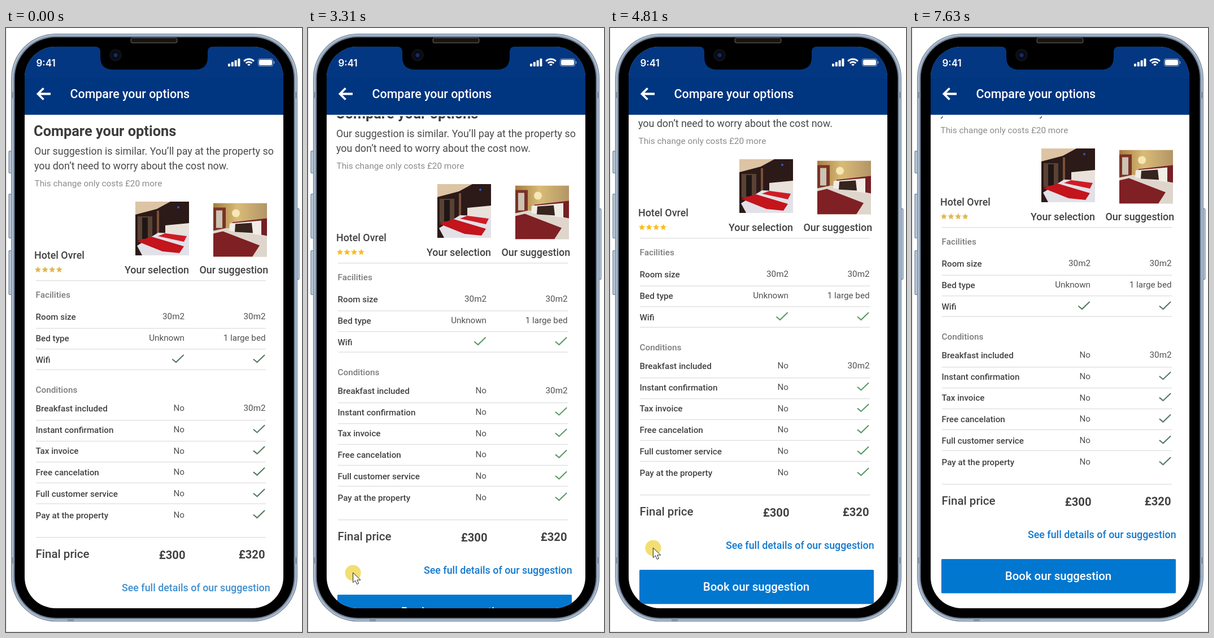
Animation of 524x1068 px, one loop 8.73 s. Source, as an HTML page with a canvas:

```html
<!DOCTYPE html>
<html lang="en">
<head>
<meta charset="utf-8">
<title>Compare your options</title>
<style>
html, body { margin: 0; width: 100%; height: 100%; overflow: hidden; background: #fff; }
canvas { display: block; width: 524px; height: 1068px; }
</style>
</head>
<body>
<canvas id="stage"></canvas>
<script>
const W = 524, H = 1068, LOOP = 8730;
const ENTER = 1790, PRESS = 2410, SETTLE = 6330, RELEASE = 7130, FLICK = 7530, LEAVE = 7630;
const SCREEN = { x: 33, y: 33, w: 458, h: 993 };
const TICK = '✓';

const canvas = document.getElementById('stage');
const ctx = canvas.getContext('2d');
const dpr = window.devicePixelRatio || 1;
canvas.width = W * dpr;
canvas.height = H * dpr;

const lerp = (a, b, k) => a + (b - a) * k;
const progress = (t, from, to) => Math.min(1, Math.max(0, (t - from) / (to - from)));
// The picture advances ten times a second
const step = (t, from) => from + Math.floor((t - from) / 100) * 100;

// A hand drag: slow grip, quick pull, long slow tail
const DRAG = [[PRESS, 0], [2910, 12], [3710, 49], [4810, 75], [SETTLE, 94]];

function scrollAt(t) {
  const now = step(t, PRESS);
  let offset = 0;
  for (let i = 1; i < DRAG.length; i++) {
    const [from, a] = DRAG[i - 1], [to, b] = DRAG[i];
    offset += (b - a) * progress(now, from, to);
  }
  return Math.round(offset);
}

function rect(x, y, w, h, fill) {
  ctx.fillStyle = fill;
  ctx.fillRect(x, y, w, h);
}

function round(x, y, w, h, r, fill) {
  ctx.beginPath();
  ctx.roundRect(x, y, w, h, r);
  ctx.fillStyle = fill;
  ctx.fill();
}

function disc(x, y, r, fill) {
  ctx.beginPath();
  ctx.arc(x, y, r, 0, 7);
  ctx.fillStyle = fill;
  ctx.fill();
}

function shape(d, fill) {
  ctx.fillStyle = fill;
  ctx.fill(new Path2D(d));
}

function stroke(d, color, width) {
  ctx.strokeStyle = color;
  ctx.lineWidth = width;
  ctx.stroke(new Path2D(d));
}

function text(str, x, y, size, weight, color, align = 'left', family = 'Roboto') {
  ctx.font = `${weight} ${size}px ${family}, sans-serif`;
  ctx.textAlign = align;
  ctx.fillStyle = color;
  ctx.fillText(str, x, y);
}

const bold = (str, x, y, size = 17.85, color = '#424242') => text(str, x, y, size, 500, color);

function translated(x, y, draw) {
  ctx.save();
  ctx.translate(x, y);
  draw();
  ctx.restore();
}

function clipped(x, y, w, h, r, draw) {
  ctx.save();
  ctx.beginPath();
  ctx.roundRect(x, y, w, h, r);
  ctx.clip();
  draw();
  ctx.restore();
}

function photo(x, y, draw) {
  clipped(x, y, 95, 95, 0, () => translated(x, y, draw));
}

function darkRoom() {
  rect(0, 0, 95, 95, '#2b1a18');
  shape('M0 0H62L38 13 0 23Z', '#dcc4a4');
  rect(4, 26, 26, 42, '#5a4234');
  rect(12, 28, 10, 38, '#1e1715');
  rect(38, 16, 4, 40, '#7d5039');
  disc(76, 10, 2, '#2d5cc0');
  shape('M53 42L95 38V62H53Z', '#e9e2da');
  shape('M3 78L40 55 95 57V95H12Z', '#e1e1e7');
  shape('M3 70L29 62 86 79 78 91 48 88Z', '#c4141c');
  shape('M40 61L53 56 91 61 86 71Z', '#d01c24');
}

function warmRoom() {
  const wall = ctx.createLinearGradient(0, 0, 95, 0);
  wall.addColorStop(0, '#a57b3f');
  wall.addColorStop(.45, '#d9bb78');
  wall.addColorStop(1, '#b39566');
  rect(0, 0, 95, 95, wall);
  rect(0, 8, 22, 42, '#7a3324');
  rect(5, 13, 11, 31, '#cbc3b4');
  disc(40, 18, 7, '#f6e7b4');
  shape('M34 34L95 27V66L34 52Z', '#751f25');
  shape('M0 49L24 44 95 58V95H0Z', '#ded6cc');
  shape('M29 36L85 31V57L28 49Z', '#f1ece5');
  shape('M39 37L68 35 70 53 38 51Z', '#36241f');
  shape('M0 54L17 50 82 75 69 95H0Z', '#7f2024');
}

function star(cx, cy, color) {
  ctx.beginPath();
  for (let i = 0; i < 10; i++) {
    const a = i * Math.PI / 5 - Math.PI / 2, r = i % 2 ? 2.7 : 6;
    ctx.lineTo(cx + r * Math.cos(a), cy + r * Math.sin(a));
  }
  ctx.fillStyle = color;
  ctx.fill();
}

function divider(y) {
  rect(53, y, 407, 1.3, '#dedede');
}

function cell(value, right, y, green) {
  if (value === TICK) translated(right - 12, y - 6.5, () => stroke('M-9 1L-3 6 10-6.5', green, 2.1));
  else text(value, right, y - .7, 15.2, 400, '#505050', 'right');
}

function section(title, titleY, firstY, pitch, rows, green) {
  bold(title, 52.5, titleY, 15.3, '#7c7c7c');
  rows.forEach(([label, ours, theirs], i) => {
    const y = firstY + pitch * i;
    bold(label, 52.5, y, 15.2);
    cell(ours, 316, y, green);
    cell(theirs, 459.5, y, green);
  });
}

const FACILITIES = [
  ['Room size', '30m2', '30m2'],
  ['Bed type', 'Unknown', '1 large bed'],
  ['Wifi', TICK, TICK]
];
const CONDITIONS = [
  ['Breakfast included', 'No', '30m2'],
  ...['Instant confirmation', 'Tax invoice', 'Free cancelation', 'Full customer service',
    'Pay at the property'].map(label => [label, 'No', TICK])
];

function page(t) {
  const moving = t >= PRESS && t < SETTLE;
  const green = moving ? '#599a67' : '#527a5f';
  const gold = moving ? '#fabd1b' : '#e0b852';
  const blue = t < PRESS ? '#408fd0' : '#1279cf';
  const body = '#4a4a4a';

  text('Compare your options', 49, 191, 25.4, 700, '#3c3c3c');
  text('Our suggestion is similar. You’ll pay at the property so', 50, 224, 17.85, 400, body);
  text('you don’t need to worry about the cost now.', 50, 249.5, 17.85, 400, body);
  text('This change only costs £20 more', 50.5, 280, 15.35, 400, '#8b8b8b');
  photo(229, 307, darkRoom);
  photo(367, 309.5, warmRoom);
  bold('Hotel Ovrel', 50, 408);
  for (let i = 0; i < 4; i++) star(56.5 + i * 12.6, 427.5, gold);
  bold('Your selection', 210, 433.5);
  bold('Our suggestion', 342.5, 433.5);

  divider(446);
  section('Facilities', 476.5, 515.5, 38, FACILITIES, green);
  for (let i = 0; i < 3; i++) divider(530.5 + 36.5 * i);
  section('Conditions', 645, 678, 37.7, CONDITIONS, green);
  for (let i = 0; i < 5; i++) divider(693 + 36.9 * i);
  divider(900);

  bold('Final price', 52.5, 937, 20.5);
  text('£300', 317.5, 939, 20.2, 700, '#424242', 'right');
  text('£320', 458.5, 938, 20.2, 700, '#424242', 'right');
  bold('See full details of our suggestion', 205, 996, 17.85, blue);
  round(52, 1033, 415, 60.5, 1.5, '#0277d0');
  text('Book our suggestion', 259, 1070, 20.4, 500, '#fff', 'center');
}

function sideButton(x, y, h) {
  round(x, y, 6.5, h, 2, '#6e7f94');
  round(x + 1.2, y + 1, 4.2, h - 2, 1.5, '#b9c9da');
}

function phoneBody() {
  sideButton(4.5, 217, 40);
  sideButton(4.5, 293, 79);
  sideButton(4.5, 393, 79);
  sideButton(513, 319, 126);
  const shell = (inset, color) =>
    round(9 + inset, 10 + inset, 507 - 2 * inset, 1039.5 - 2 * inset, 79 - inset, color);
  ['#728297', '#b4c4d5', '#a9bacc', '#8fa1b5', '#75879b', '#3c4756'].forEach((c, i) => shell(i * 1.2, c));
  for (const y of [113, 936]) {
    rect(9, y, 6, 11, '#8793a1');
    rect(510, y, 6, 11, '#8793a1');
  }
  rect(109, 1044, 11, 5.5, '#8793a1');
  shell(6.8, '#000');
}

function statusBar() {
  text('9:41', 53.5, 67.5, 17, 600, '#fff', 'left', 'Inter');
  for (let i = 0; i < 4; i++) {
    const h = 5 + i * 3;
    round(393 + i * 5.8, 68 - h, 4, h, 1, '#fff');
  }
  for (const r of [12.5, 7.5, 2.5]) {
    ctx.beginPath();
    ctx.arc(430, 67.5, r, -Math.PI * .75, -Math.PI * .25);
    ctx.strokeStyle = '#fff';
    ctx.lineWidth = 2.8;
    ctx.stroke();
  }
  round(446, 54, 27, 14, 4, '#8ba1c4');
  round(447, 55, 25, 12, 3, '#043781');
  round(448, 56, 23, 10, 2.5, '#fff');
  round(473.8, 58.8, 1.6, 4.5, 1, '#8ba1c4');
}

function header() {
  rect(SCREEN.x, SCREEN.y, SCREEN.w, 120.5, '#003580');
  rect(SCREEN.x, SCREEN.y, SCREEN.w, 55, '#043781');
  ctx.lineCap = 'butt';
  statusBar();
  stroke('M57 116.5H79M66.5 106.5L56.5 116.5 66.5 126.5', '#fff', 3.8);
  text('Compare your options', 113.5, 124, 21.4, 500, '#fff');
}

function notch() {
  shape('M158 30V33Q167 33 167 42V51Q167 73.5 189 73.5H335Q357 73.5 357 51V42Q357 33 366 33V30Z', '#000');
  round(220.5, 17, 83, 10, 4, '#504b48');
  round(222, 18, 80, 7.5, 3, '#171513');
  disc(194, 48, 11, '#0e1015');
  disc(194, 48, 7.5, '#070b18');
  disc(194, 48, 3.5, '#172d5c');
}

function pointerAt(t, scroll) {
  if (t >= FLICK) return [90, 924];
  if (t >= PRESS) return [82 - scroll * .075, 994.5 - scroll];
  const k = progress(step(t, ENTER), ENTER, ENTER + 400);
  return [lerp(153, 82, k) - 76 * Math.sin(Math.PI * k), lerp(1052, 1008, k)];
}

function pointer(t, scroll) {
  if (t < ENTER || t >= LEAVE) return;
  const [x, y] = pointerAt(t, scroll);
  if (t >= PRESS && t < RELEASE) disc(x, y, 14, t < 3310 ? '#faf08b' : '#f2df72');
  translated(x, y, () => {
    const arrow = 'M0 0V17L4 13.5 7 20 10 18.6 7.2 12.5H13Z';
    shape(arrow, '#fff');
    stroke(arrow, '#222', 1);
  });
}

function render(t) {
  const scroll = scrollAt(t);
  ctx.setTransform(dpr, 0, 0, dpr, 0, 0);
  ctx.lineCap = 'round';
  rect(0, 0, W, H, '#e2e2e2');
  rect(1, 0, W - 1, H - 1, '#fff');
  phoneBody();
  clipped(SCREEN.x, SCREEN.y, SCREEN.w, SCREEN.h, 55, () => {
    rect(SCREEN.x, SCREEN.y, SCREEN.w, SCREEN.h, '#fff');
    clipped(SCREEN.x, 156, SCREEN.w, 870, 0, () => translated(0, -scroll, () => page(t)));
    header();
  });
  notch();
  pointer(t, scroll);
}

let start;
function frame(now) {
  start ??= now;
  render((now - start) % LOOP);
  requestAnimationFrame(frame);
}
render(0);
requestAnimationFrame(frame);
</script>
</body>
</html>
```
